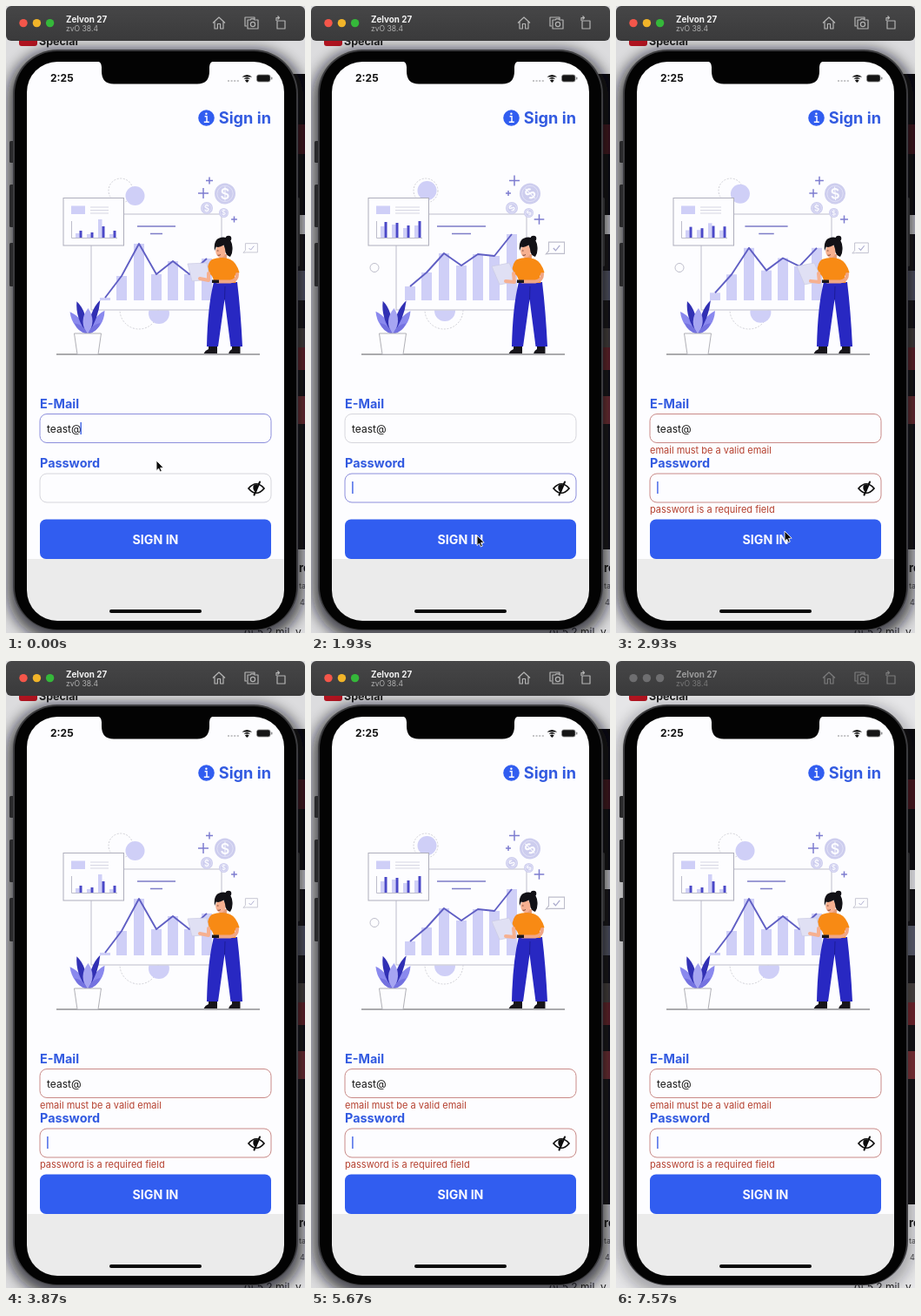
An HTML page that plays this animation: 344 by 720 pixels, repeating every 7.61 s.

```html
<!DOCTYPE html>
<html lang="en">
<head>
<meta charset="utf-8">
<title>Sign in</title>
<style>
  html, body { margin: 0; width: 100%; height: 100%; overflow: hidden; background: #ccc; }
  svg { display: block; width: 344px; height: 720px; }
  text { font-family: Inter, "Noto Sans", sans-serif; }
  .label { font-weight: 700; font-size: 14.4px; fill: #325ae0; }
  .error { font-size: 11px; fill: #b5402f; }
  .thin { fill: none; stroke: #bdbdcb; stroke-width: 1; }
  .dash { fill: none; stroke: #cbcbd2; stroke-width: .9; stroke-dasharray: 2 1.6; }
  .soft { fill: #cfcff7; }
  .deep { fill: #4b49c8; }
  .plus { stroke: #7d7cd0; stroke-width: 1.5; }
  .icon { fill: none; stroke: #b4b4b4; stroke-width: 1.2; stroke-linejoin: round; }
  .coin text { font-weight: 600; fill: #fcfcff; text-anchor: middle; }
</style>
</head>
<body>
<svg viewBox="0 0 344 720" xmlns="http://www.w3.org/2000/svg">
  <defs>
    <linearGradient id="barFill" x1="0" y1="0" x2="0" y2="1">
      <stop offset="0" stop-color="#464647"/><stop offset="1" stop-color="#3a3a3b"/>
    </linearGradient>
    <filter id="blur" x="-20%" y="-20%" width="140%" height="140%"><feGaussianBlur stdDeviation="8"/></filter>
    <clipPath id="below"><rect x="100" y="349.5" width="130" height="40"/></clipPath>
    <clipPath id="screenClip"><rect x="24" y="64" width="296" height="642" rx="35"/></clipPath>
  </defs>

  <!-- page behind the window -->
  <rect id="page" width="344" height="720"/>
  <g>
    <rect x="15" y="34" width="21" height="12" rx="3" fill="#b01420"/>
    <text x="38" y="45" font-size="12.5" font-weight="700" fill="#202020">Special</text>
    <rect x="330" y="78" width="14" height="162" fill="#0c0b0d"/>
    <rect x="330" y="136" width="14" height="34" fill="#45141a"/>
    <rect x="330" y="262" width="14" height="362" fill="#131214"/>
    <rect x="330" y="304" width="14" height="34" fill="#5a5d6c"/>
    <rect x="330" y="370" width="14" height="22" fill="#4a4340"/>
    <rect x="330" y="392" width="14" height="26" fill="#70242a"/>
    <rect x="330" y="448" width="14" height="32" fill="#7b3034"/>
    <text x="337" y="650" font-size="13" font-weight="700" fill="#151515">re</text>
    <text x="337" y="669" font-size="9" fill="#484848">ta</text>
    <text x="338" y="688" font-size="9" fill="#484848">4</text>
    <text x="274" y="723" font-size="12" fill="#202020">of 5.2 mil. v</text>
  </g>
  <rect id="shade" x="2" y="50" width="340" height="678" rx="56" fill="#101012" filter="url(#blur)"/>

  <!-- window bar -->
  <rect width="344" height="40" rx="6" fill="url(#barFill)"/>
  <g id="lights">
    <circle cx="20" cy="19.6" r="4.7"/><circle cx="35.4" cy="19.6" r="4.7"/><circle cx="50.6" cy="19.6" r="4.7"/>
  </g>
  <g id="barText">
    <text x="69" y="18.5" font-size="9.8" font-weight="700" fill="#f4f4f4">Zelvon 27</text>
    <text x="69" y="29.3" font-size="8.6" fill="#b0b0b0">zvO 38.4</text>
    <g class="icon">
      <path d="M238 19.5L245 13L252 19.5M240 18V26H243.4V20.5H246.6V26H250V18"/>
      <path d="M277 23H275V13H286V15M278 16H281L282 14.8H285L286 16H290V26H278Z"/>
      <circle cx="284" cy="21" r="2.6"/>
      <path d="M312 17H321V26H312ZM314 13.5H311V17M312.500 11.500L314.500 13.500L312.500 15.500"/>
    </g>
  </g>

  <!-- phone -->
  <g fill="#29292b">
    <rect x="4" y="155" width="6" height="25" rx="1.5"/>
    <rect x="4" y="205" width="6" height="49" rx="1.5"/>
    <rect x="4" y="272" width="6" height="50" rx="1.5"/>
    <rect x="334" y="220" width="4" height="79" rx="1.5"/>
  </g>
  <rect x="8" y="50" width="328" height="667" rx="51" fill="#3c3c3f"/>
  <rect x="10" y="52" width="324" height="664" rx="49" fill="#030303"/>
  <g clip-path="url(#screenClip)">
    <rect x="24" y="64" width="296" height="572" fill="#fdfdff"/>
    <rect x="24" y="635" width="296" height="72" fill="#ebebeb"/>
  </g>
  <path d="M104 63Q110 64 110 70V75Q110 89.500 124 89.500H220Q234 89.500 234 75V70Q234 64 240 63Z" fill="#030303"/>
  <rect x="119" y="693" width="106" height="4" rx="2" fill="#080808"/>

  <!-- status row -->
  <text x="51" y="87" font-size="12" font-weight="650" fill="#111">2:25</text>
  <path d="M255 86H268" stroke="#c4c4c6" stroke-width="2" stroke-dasharray="2 1.6"/>
  <path d="M277.3 88L274.9 85.4Q277.3 83.4 279.7 85.4ZM273.4 83.8Q277.3 80.2 281.2 83.8M271.4 81.6Q277.3 76.4 283.2 81.6" fill="#111"/>
  <rect x="288.5" y="79" width="15.5" height="8" rx="2.3" fill="#151515" stroke="#88888a" stroke-width=".8"/>
  <rect x="305" y="81.6" width="1.4" height="3" rx=".7" fill="#88888a"/>

  <!-- heading -->
  <circle cx="230.5" cy="128.5" r="9.3" fill="#315df0"/>
  <path d="M228.6 126.7H231V133M227.8 133.3H233.8" stroke="#fdfdff" stroke-width="1.5" fill="none"/>
  <circle cx="230.4" cy="123.7" r="1.2" fill="#fdfdff"/>
  <text x="305" y="135" text-anchor="end" font-size="18.2" font-weight="700" fill="#325ae0">Sign in</text>

  <!-- illustration -->
  <circle class="dash" cx="132" cy="212" r="14"/>
  <circle id="topDisc" class="soft" r="11"/>
  <g clip-path="url(#below)">
    <circle class="dash" cx="153" cy="349" r="22"/>
    <circle id="lowDisc" class="soft" r="12"/>
  </g>
  <circle id="ring" class="thin" cx="73" cy="300.5"/>
  <rect class="thin" x="98" y="239" width="150" height="110" style="fill:#fdfdff"/>
  <path id="caption" stroke="#7d7cc8" stroke-width="1.5"/>
  <g id="bars" class="soft"></g>
  <polyline id="trend" fill="none" stroke="#605fc4" stroke-width="1.9" stroke-linejoin="round"/>
  <rect x="66" y="220.5" width="69.5" height="54.5" fill="#fdfdff" stroke="#aeaebc"/>
  <rect class="soft" x="75" y="229.5" width="16" height="9.5"/>
  <path id="cardLines" stroke="#d6d6e2" stroke-width="1"/>
  <path class="thin" d="M75.5 247V266.5H128"/>
  <g id="miniBars"></g>
  <g id="pluses"></g>
  <g id="coins"></g>
  <g id="bubble">
    <path class="thin" d="M-8 -6.5H9V6H-7L-11 6.5L-8 3Z"/>
    <path d="M-3 0L-.5 2.6L4 -3" fill="none" stroke="#a9a9cc" stroke-width="1.1"/>
  </g>

  <path d="M58 400H292" stroke="#58585c" stroke-width="1.2"/>
  <g id="plant">
    <path d="M94 377Q76 370 74 351Q88 357 94 377ZM94 377Q113 370 114 350Q100 357 94 377Z" fill="#8a89ee"/>
    <path d="M94 377Q80 359 82 339Q94 350 94 377ZM94 377Q107 359 109 338Q96 350 94 377Z" fill="#3130b4"/>
    <path d="M94 377Q83 362 95 347Q105 362 94 377Z" fill="#a6a5f2"/>
    <path d="M94 377Q82 374 79 364Q90 366 94 377ZM94 377Q106 374 109 364Q98 366 94 377Z" fill="#7472e0"/>
  </g>
  <path d="M78.5 376H109.5L106 400H82Z" fill="#fdfdff" stroke="#b0b0b6"/>

  <g id="woman">
    <path d="M233 390H243V399H227.5Q229 395.500 233 394ZM260 390H269.500V399H256Q257 395.500 260 394Z" fill="#17151a"/>
    <path d="M239 317H266Q270 350 272 391H258.500L251.500 337L244 391H231Q232 345 239 317Z" fill="#2828c2"/>
    <path d="M251.500 337L252 322" stroke="#1c1c96" stroke-width="1"/>
    <path d="M246 285H254V295H245Z" fill="#e59c78"/>
    <path d="M237 291Q248 287 258 291Q265 294 268.500 306L263 310L264.500 318H239Q239 308 231 306Q232 294 237 291Z" fill="#f88a14"/>
    <ellipse cx="247" cy="281.500" rx="5.800" ry="7.500" fill="#f6b090"/>
    <path d="M240 281Q238 266 250 265.500Q260 266 260.500 277Q261 284 258 288Q252.500 287 252 279L250.500 274.500Q245 278 241.800 276.500Z" fill="#121116"/>
    <circle cx="256" cy="267" r="3.300" fill="#121116"/>
    <path d="M242.800 281H244.500M243.500 286Q245 287 247 285.500" stroke="#5a2d22" stroke-width=".8" fill="none"/>
    <path id="paper" fill="#e0e0f4" stroke="#cbcbe2" stroke-width=".7"/>
    <path id="arm" fill="none" stroke="#f6b090" stroke-width="4" stroke-linecap="round" stroke-linejoin="round"/>
    <path d="M266 308Q266 315.500 258 316.500L243 316.500" fill="none" stroke="#f0a685" stroke-width="4" stroke-linecap="round"/>
    <path d="M237 314.500H245V318H237Z" fill="#1a171c"/>
  </g>

  <!-- form -->
  <text class="label" x="39" y="462">E-Mail</text>
  <rect id="mailBox" x="39" y="468.500" width="266" height="33" rx="8" fill="#fdfdff"/>
  <text x="47" y="489.500" font-size="12" fill="#161616">teast@</text>
  <text class="label" x="39" y="530">Password</text>
  <rect id="passBox" x="39" y="537" width="266" height="33" rx="8" fill="#fdfdff"/>
  <g fill="none" stroke="#0c0c0c" stroke-width="1.700" stroke-linecap="round">
    <path d="M279 554Q288 543.500 297 554Q288 564.500 279 554Z"/>
    <path d="M284.500 551Q283.500 557 288 558.500L289.500 549.500Q286 548.500 284.500 551Z" fill="#0c0c0c" stroke="none"/>
    <path d="M292 546.500L285.500 561.500" stroke-width="2"/>
  </g>
  <rect id="caret" width="1.400" height="14" fill="#3f62e6"/>
  <g id="errors">
    <text class="error" x="39" y="513.500">email must be a valid email</text>
    <text class="error" x="39" y="582">password is a required field</text>
  </g>
  <rect x="39" y="589.500" width="266" height="45.500" rx="7" fill="#315df0"/>
  <text x="172" y="617.500" text-anchor="middle" font-size="14.200" font-weight="700" fill="#f8f8ff">SIGN IN</text>
  <path id="cursor" d="M0 0V11.500L2.600 9.200L4.400 13L6.300 12.100L4.600 8.400L8.200 8.100Z" fill="#0b0b0b" stroke="#f7f7f7" stroke-width=".9"/>
</svg>

<script>
const LOOP = 7610;
const CYCLE = LOOP / 2;
const FOCUS_AT = 640, ERRORS_AT = 2330, BLUR_AT = 7170;

// centre x, top at rest, top when raised
const BARS = [[114, 335, 322], [133, 310, 306], [153, 273, 284], [173, 308, 298],
              [192, 293, 285], [211, 308, 287], [231, 290, 262]];
// x, light rest, light raised, dark rest, dark raised
const MINI = [[84, 5, 13, 8, 18], [97, 4, 15, 6, 17], [110, 21, 11, 13, 14], [123, 4, 14, 8, 19]];
// x, y, arm at rest, arm when raised
const PLUSES = [[234, 200.5, 4, 6], [227, 215, 6, 3], [262.5, 245, 3.4, 5.8]];
const COINS = [[252, 215.5, 12], [231, 232, 7], [250.5, 237.5, 5.5]];
// time, x, y of the pointer
const POINTER = [[0, 173, 522], [330, 173, 548], [660, 174, 550], [1130, 204, 596], [1500, 196, 607],
                 [1930, 191, 608], [2400, 193, 606], [2930, 194, 603], [3200, 198, 606], [3900, 352, 724]];

const $ = id => document.getElementById(id);
const mix = (a, b, k) => a + (b - a) * k;
const clamp = k => Math.min(1, Math.max(0, k));
const smooth = k => { k = clamp(k); return k * k * (3 - 2 * k); };
const set = (el, attrs) => { for (const k in attrs) el.setAttribute(k, attrs[k]); };
const add = (parent, tag, attrs) => {
  const el = document.createElementNS("http://www.w3.org/2000/svg", tag);
  set(el, attrs);
  return parent.appendChild(el);
};

const bars = BARS.map(([x]) => add($("bars"), "rect", { x: x - 6, width: 12 }));
const minis = MINI.map(([x]) => [
  add($("miniBars"), "rect", { x: x - 4, width: 4.5, class: "soft" }),
  add($("miniBars"), "rect", { x: x + .5, width: 3, class: "deep" })
]);
const pluses = PLUSES.map(() => add($("pluses"), "path", { class: "plus" }));
const coins = COINS.map(([x, y, r]) => {
  const g = add($("coins"), "g", { class: "coin" });
  add(g, "circle", { r, fill: "#cdcdee" });
  add(g, "circle", { r: r * .76, fill: "none", stroke: "#e4e4f8", "stroke-width": .8 });
  add(g, "text", { y: r * .5, "font-size": r * 1.4 }).textContent = "$";
  return g;
});

function drawScene(t) {
  const p = t % CYCLE / CYCLE;
  const a = (1 - Math.cos(2 * Math.PI * p)) / 2;
  const orbit = p < .5 ? smooth((p - .1) / .23) : 1 - smooth((p - .53) / .41);

  set($("topDisc"), { cx: mix(148.5, 133.5, orbit), cy: mix(218, 212, orbit) });
  set($("lowDisc"), { cx: mix(176, 154, a), cy: mix(353, 350, a) });
  set($("ring"), { r: 5 * smooth(a * 4) });

  const w1 = mix(22, 28, a), w2 = mix(7, 11, a), w3 = mix(118, 125, a);
  set($("caption"), { d: `M${173 - w1} 253H${173 + w1}M${173 - w2} 261.5H${173 + w2}` });
  set($("cardLines"), { d: `M97 231H${w3}M97 234.5H${w3}M97 238H${w3}` });

  const tops = BARS.map(b => mix(b[1], b[2], a));
  bars.forEach((el, i) => set(el, { y: tops[i], height: 338 - tops[i] }));
  set($("trend"), { points: BARS.map((b, i) => `${b[0]},${tops[i]}`).join(" ") });

  minis.forEach((pair, i) => pair.forEach((el, j) => {
    const h = mix(MINI[i][1 + 2 * j], MINI[i][2 + 2 * j], a);
    set(el, { y: 266 - h, height: h });
  }));
  pluses.forEach((el, i) => {
    const [x, y, r0, r1] = PLUSES[i], r = mix(r0, r1, a);
    set(el, { d: `M${x - r} ${y}H${x + r}M${x} ${y - r}V${y + r}` });
  });
  coins.forEach((el, i) => {
    const [x, y] = COINS[i];
    set(el, { transform: `translate(${x} ${y}) rotate(${-45 * a ** 3})` });
  });
  set($("bubble"), { transform: `translate(282 278) scale(${mix(.82, 1.06, a)})` });
  set($("plant"), { transform: `rotate(${mix(-1, 1, a)} 94 377)` });

  const k = smooth(a * 2);
  const corner = (x0, y0, x1, y1) => `${mix(x0, x1, k)} ${mix(y0, y1, k)}`;
  set($("paper"), {
    d: `M${corner(209, 296, 208, 299)}L${corner(231, 295, 228, 295)}L${corner(235, 314, 238, 316)}L${corner(214, 316, 217, 320)}Z`
  });
  set($("arm"), { d: `M233 307L${corner(233, 315, 234, 317)}L${corner(223, 313, 224, 316)}` });
}

function drawPointer(t) {
  const last = POINTER.length - 1;
  const shown = t < POINTER[last][0];
  $("cursor").style.display = shown ? "" : "none";
  if (!shown) return;
  const i = POINTER.findIndex((s, n) => n < last && t < POINTER[n + 1][0]);
  const [t0, x0, y0] = POINTER[i], [t1, x1, y1] = POINTER[i + 1];
  const k = smooth((t - t0) / (t1 - t0));
  set($("cursor"), { transform: `translate(${mix(x0, x1, k)} ${mix(y0, y1, k)})` });
}

function drawForm(t) {
  const onPass = t >= FOCUS_AT, failed = t >= ERRORS_AT;
  const border = focused => failed ? "#c98a88" : focused ? "#8c8edc" : "#d6d6dc";
  set($("mailBox"), { stroke: border(!onPass) });
  set($("passBox"), { stroke: border(onPass) });
  $("errors").style.display = failed ? "" : "none";

  const f = t % 1000 / 1000;
  const glow = f < .45 ? 1 - clamp((f - .08) / .1) : clamp((f - .45) / .08);
  set($("caret"), { x: onPass ? 47.2 : 85.5, y: onPass ? 546 : 478, opacity: glow });
}

function drawWindow(t) {
  const active = t < BLUR_AT;
  const colors = active ? ["#f4564a", "#f1b429", "#35b83a"] : Array(3).fill("#6e6e70");
  [...$("lights").children].forEach((el, i) => set(el, { fill: colors[i] }));
  set($("barText"), { opacity: active ? 1 : .5 });
  set($("shade"), { opacity: active ? .72 : .3 });
  set($("page"), { fill: active ? "#dcdcde" : "#e6e6e8" });
}

function frame() {
  const t = performance.now() % LOOP;
  drawScene(t);
  drawPointer(t);
  drawForm(t);
  drawWindow(t);
  requestAnimationFrame(frame);
}
frame();
</script>
</body>
</html>
```
